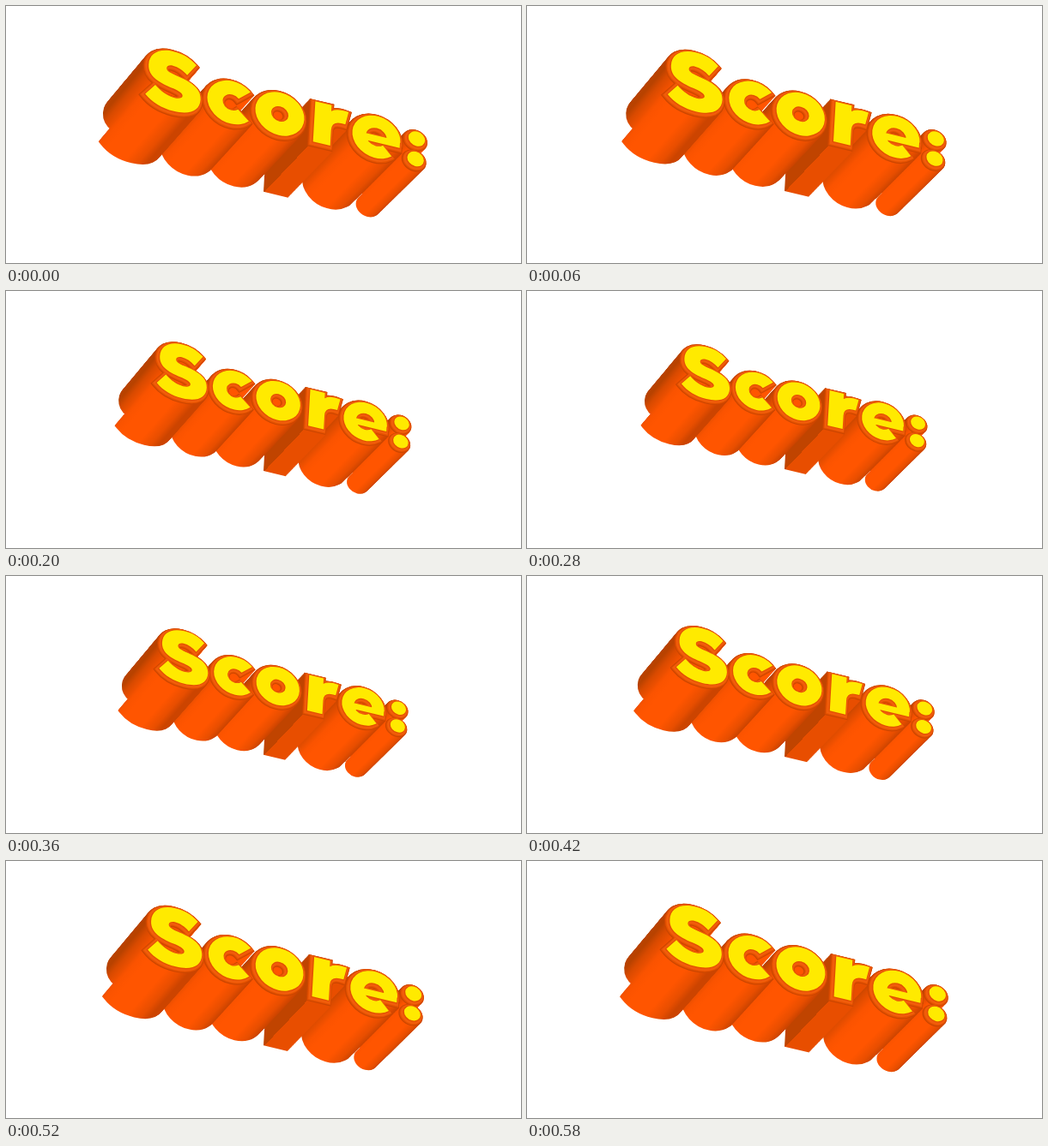
An HTML page with a canvas that plays this animation: 600x300 px, repeating every 600 ms.

```html
<!DOCTYPE html>
<html lang="en">
<head>
<meta charset="utf-8">
<title>Score:</title>
<style>
  html, body { margin: 0; width: 100%; height: 100%; overflow: hidden; background: #fff; }
  canvas { display: block; }
</style>
</head>
<body>
<canvas id="stage" width="600" height="300" role="img" aria-label="Score:"></canvas>
<script>
const ctx = document.getElementById('stage').getContext('2d');
const LOOP = 600, STEP = 20, LAYERS = 76, BEVEL = 4.7;
const YELLOW = '#ffea00';
const RIM = ['#cc4600', '#e65200', '#f25e0c', '#f05c0c', '#e25000'];
const ROUND = [[0, '#b84200'], [0.1, '#d84a00'], [0.28, '#fa5300'], [0.4, '#ff5500'],
  [0.72, '#ff5500'], [0.9, '#e84e00'], [1, '#cc4400']];
const FLAT = [[0, '#c04400'], [0.57, '#c04400'], [0.57, '#e84e00'], [1, '#e84e00']];

// Glyph space: x along the baseline, y downwards, origin in the middle of the "o".
function arcBand(cx, outer, inner, from, to) {
  const path = new Path2D(), rad = Math.PI / 180;
  path.arc(cx, 0, outer, from * rad, to * rad);
  if (to - from === 360) path.closePath(), path.moveTo(cx + inner, 0);
  path.arc(cx, 0, inner, to * rad, from * rad, true);
  path.closePath();
  return path;
}

function dots(cx, ys, r) {
  const path = new Path2D();
  for (const y of ys) {
    path.moveTo(cx + r, y);
    path.arc(cx, y, r, 0, 2 * Math.PI);
  }
  return path;
}

const letterS = new Path2D(`M-99 -38C-107 -46 -116 -49 -126 -49C-143 -49 -154 -39 -154 -24
  C-154 -7 -139 -3 -124 0C-116 2 -113 4 -113 7C-113 10 -117 12 -122 12C-130 12 -138 8 -145 1
  L-156 16C-148 25 -136 30 -122 30C-103 30 -92 21 -92 6C-92 -10 -107 -15 -122 -18
  C-131 -20 -133 -22 -133 -25C-133 -28 -130 -30 -126 -30C-120 -30 -114 -27 -109 -22Z`);
const letterR = new Path2D('M40 -28H59V-20Q66 -26 79 -24L76 -7Q60 -9 60 5V26H40Z');
const letterE = arcBand(112.5, 28, 12, 48, 360);
letterE.rect(91, -2, 49, 9);

// mid and half: centre and half width of the shading, measured across the extrusion
const glyphs = [
  { path: letterS, mid: -110, half: 37, stops: ROUND },
  { path: arcBand(-56, 28.5, 10.5, 43, 317), mid: -48, half: 33, stops: ROUND },
  { path: arcBand(0, 28.5, 10, 0, 360), mid: 0, half: 33, stops: ROUND },
  { path: letterR, mid: 43, half: 29, stops: FLAT },
  { path: letterE, mid: 96, half: 33, stops: ROUND },
  { path: dots(159, [-10.5, 16.5], 9.7), mid: 138.5, half: 21, stops: ROUND }
];

for (const glyph of glyphs) {
  const nx = 0.854, ny = 0.52, a = glyph.mid - glyph.half, b = glyph.mid + glyph.half;
  glyph.side = ctx.createLinearGradient(a * nx, a * ny, b * nx, b * ny);
  for (const [at, color] of glyph.stops) glyph.side.addColorStop(at, color);
}

function place(scale, dx, dy, shrink) {
  ctx.setTransform(scale, 0, 0, scale, 300 * (1 - scale), 148 * (1 - scale));
  ctx.translate(319 + dx, 150 + dy);
  ctx.scale(shrink, shrink);
  ctx.transform(1, 0.24, -0.05, 0.87, 0, -24);
}

function paint(path, color, grow) {
  ctx.fillStyle = ctx.strokeStyle = color;
  ctx.fill(path);
  if (grow) {
    ctx.lineWidth = 2 * grow;
    ctx.stroke(path);
  }
}

function draw(time) {
  const t = Math.floor(time % LOOP / STEP) * STEP;
  const scale = 0.935 + 0.065 * Math.cos(2 * Math.PI * t / LOOP);
  ctx.setTransform(1, 0, 0, 1, 0, 0);
  ctx.fillStyle = '#fff';
  ctx.fillRect(0, 0, 600, 300);

  // extrusion from the back to the rim, then the bevel, then the face
  for (let i = LAYERS; i >= 0; i--) {
    const depth = i / LAYERS;
    place(scale, -2 - 50 * depth, 2 + 53.8 * depth, 1 - 0.022 * depth);
    for (const g of glyphs) paint(g.path, g.side, BEVEL);
  }
  RIM.forEach((color, i) => {
    const left = 1 - i / RIM.length;
    place(scale, -2 * left, 2 * left, 1);
    for (const g of glyphs) paint(g.path, color, BEVEL * left);
  });
  place(scale, 0, 0, 1);
  for (const g of glyphs) paint(g.path, YELLOW, 0);
}

function tick() {
  draw(performance.now());
  requestAnimationFrame(tick);
}
tick();
</script>
</body>
</html>
```
